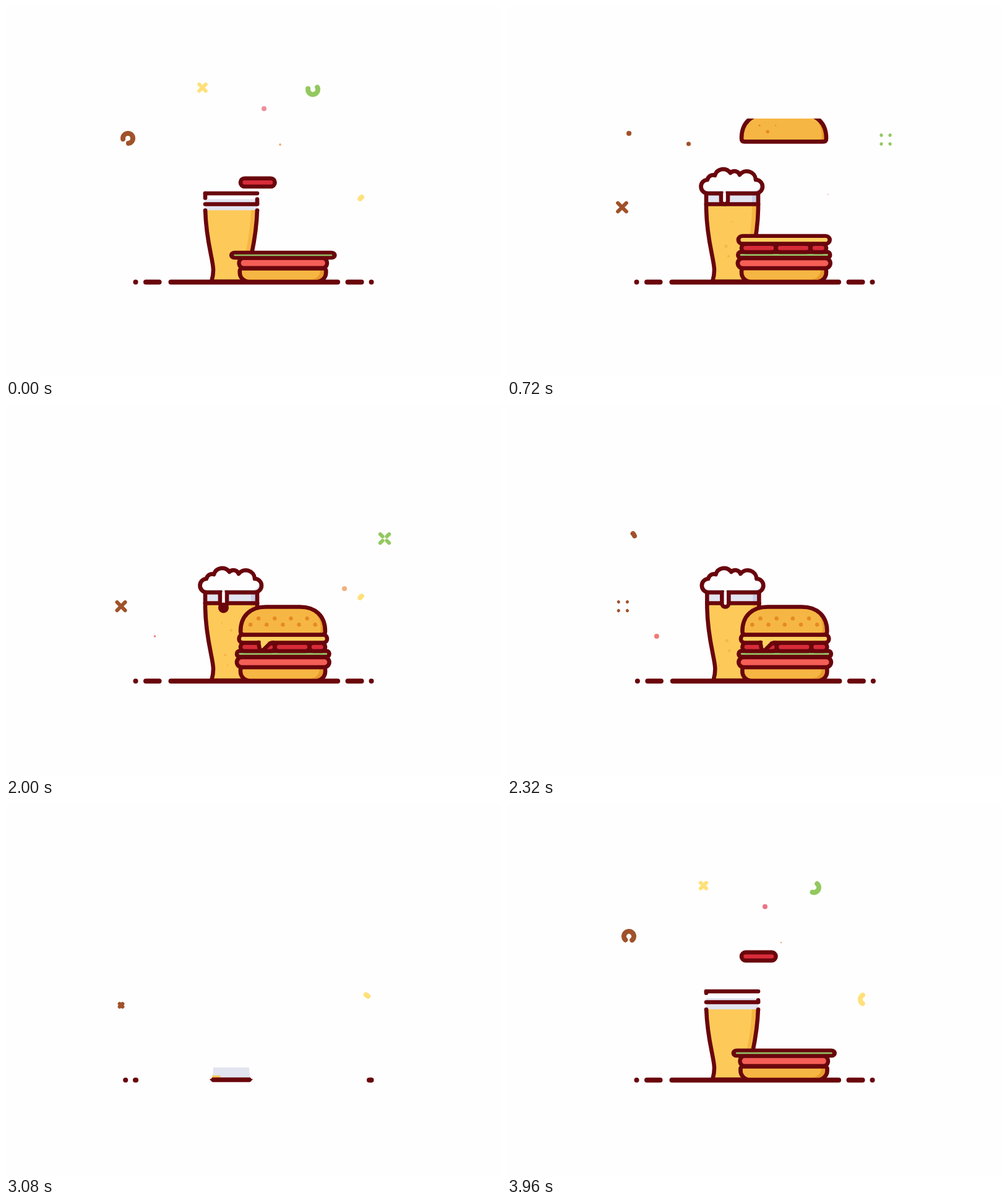
Recreate the animation shown at these times as an HTML page with a canvas. Size 800 px wide and 600 px high, loop 4000 ms.

```html
<!DOCTYPE html>
<html lang="en">
<head>
<meta charset="utf-8">
<title>Beer and burger</title>
<style>
  html, body { margin: 0; width: 100%; height: 100%; overflow: hidden; background: #fefefe; }
  canvas { display: block; }
</style>
</head>
<body>
<canvas id="stage" width="800" height="600"></canvas>
<script>
const ctx = document.getElementById('stage').getContext('2d');
const LOOP = 4000, BUILD_START = 2810, CONFETTI_PERIOD = LOOP / 3, STROKE = 6.6;
const INK = '#69060c', WHITE = '#fefefe', GLASS = '#e2e4f0', BEER = '#fdca59';
const BUN = '#f6b643', BUN_SHADE = '#e99a2c', CHEESE = '#fdd060', TOMATO = '#d82c39';
const BROWN = '#a0522a', YELLOW = '#ffe07a', GREEN = '#93c85f', PINK = '#ea7488', ORANGE = '#f0a56c';

const clamp = v => Math.max(0, Math.min(1, v));
const ramp = (t, start, duration) => clamp((t - start) / duration);
const mix = (a, b, p) => a + (b - a) * p;
const easeOut = p => 1 - (1 - p) ** 3;
const easeInOut = p => p < .5 ? 4 * p ** 3 : 1 - 4 * (1 - p) ** 3;
const backOut = p => 1 + 2.7 * (p - 1) ** 3 + 1.7 * (p - 1) ** 2;
const wobble = d => d < 0 ? 0 : Math.exp(-d / 220) * Math.sin(d * Math.PI / 150);

function scoped(draw) { ctx.save(); draw(); ctx.restore(); }

function line(x1, y1, x2, y2, width = STROKE, color = INK) {
  ctx.strokeStyle = color;
  ctx.lineWidth = width;
  ctx.beginPath();
  ctx.moveTo(x1, y1);
  ctx.lineTo(x2, y2);
  ctx.stroke();
}

function disc(x, y, r, color) {
  ctx.fillStyle = color;
  ctx.beginPath();
  ctx.arc(x, y, Math.max(0, r), 0, 7);
  ctx.fill();
}

function outline(path) {
  ctx.strokeStyle = INK;
  ctx.lineWidth = STROKE;
  ctx.stroke(path);
}

function outlined(path, fill) {
  ctx.fillStyle = fill;
  ctx.fill(path);
  outline(path);
}

// Fills with a shade, then with the main colour shifted inside the same shape.
function shaded(path, base, shade, dx, dy) {
  scoped(() => {
    ctx.clip(path);
    ctx.fillStyle = shade;
    ctx.fill(path);
    ctx.translate(dx, dy);
    ctx.fillStyle = base;
    ctx.fill(path);
  });
  outline(path);
}

function rounded(x1, y1, x2, y2, r) {
  const path = new Path2D();
  path.roundRect(x1, y1, x2 - x1, y2 - y1, r);
  return path;
}

const side = 'M322 303V328C323 380 335 410 335 427Q335 436 332.5 444';
const leftSide = new Path2D(side);
const rightSide = new Path2D('M406 303V328C405 380 393 410 393 427Q393 436 395.5 444');
const glassBody = new Path2D(side + 'H395.5Q393 436 393 427C393 410 405 380 406 328V303Z');
const foam = new Path2D('M325 303A11 11 0 0 1 324 281A9 9 0 0 1 336 274A14 14 0 0 1 361 270' +
  'A9 9 0 0 1 376 273A14.5 14.5 0 0 1 402 281A11 11 0 0 1 402 303Z');
const topBun = new Path2D('M384 371.5Q379 371.5 379 366C379 341 395 326.5 420 326.5H475' +
  'C500 326.5 516 341 516 366Q516 371.5 511 371.5Z');
const bottomBun = rounded(379, 424, 516, 446, [4, 4, 15, 15]);
const cheeseDrip = new Path2D('M408 384L409.5 393Q412 400 417 395L423 389Q428 384.5 432 384.5');

// Drops a layer onto the pile and lets it wobble around its lower edge.
function drop(t, landing, centerX, baseY, amount, draw) {
  const p = ramp(t, landing - 470, 470);
  if (p <= 0) return;
  const squash = amount * wobble(t - landing);
  scoped(() => {
    ctx.beginPath();
    ctx.rect(0, 182, 800, 418);
    ctx.clip();
    ctx.translate(centerX, baseY - 300 * (1 - p * p));
    ctx.scale(1 + squash, 1 - squash * .8);
    ctx.translate(-centerX, -baseY);
    draw();
  });
}

function drawGround(t) {
  if (t < 3030) return;
  const grow = easeOut(ramp(t, 3080, 400));
  const spread = easeOut(ramp(t, 3100, 420));
  const dotX = mix(183, 209.5, ramp(t, 3030, 130));
  line(dotX, 446.5, dotX, 446.5, 8);
  line(mix(209, 226, grow), 446.5, mix(210, 247.5, grow), 446.5, 8);
  if (spread) line(mix(364, 266.5, spread), 446.5, mix(364, 536, spread), 446.5, 8);
  line(mix(587, 552.5, grow), 446.5, mix(589, 574.5, grow), 446.5, 8);
  line(590.5, 446.5, 590.5, 446.5, 8);
}

function drawBubbles(t) {
  if (t < 4560) return;
  const xs = [342, 354, 364, 375, 388, 349, 358];
  xs.forEach((x, i) => {
    const p = ((t - 4560) / 1500 + i * .37) % 1;
    disc(x, 440 - 108 * p, 2.6 * Math.sin(Math.PI * p), '#f4b84b');
  });
}

function drawGlass(t) {
  if (t < 3010) return;
  const glassTop = mix(443, 303, easeOut(ramp(t, 3010, 1667)));
  const beerTop = mix(443, 320, easeOut(ramp(t, 3062, 1667)));
  const strokeTop = mix(446, 320, easeOut(ramp(t, 3075, 1640)));
  scoped(() => {
    ctx.clip(glassBody);
    ctx.fillStyle = GLASS;
    ctx.fillRect(310, glassTop, 110, 444 - glassTop);
    if (t > 4300) {
      ctx.fillStyle = '#c9cfe6';
      ctx.fillRect(396, 303, 10, 17);
    }
    ctx.fillStyle = BEER;
    const beerWidth = Math.max(0, t - 3060) * .7;
    ctx.fillRect(336 - Math.min(20, beerWidth / 4), beerTop, Math.min(90, beerWidth), 444 - beerTop);
    if (t > 3200) {
      ctx.beginPath();
      ctx.rect(310, Math.max(beerTop, 323), 110, 130);
      ctx.clip();
      ctx.translate(-6, 0);
      ctx.strokeStyle = BUN;
      ctx.lineWidth = 8;
      ctx.stroke(rightSide);
      ctx.translate(6, 0);
    }
    drawBubbles(t);
  });

  line(335, 446, 393, 446, 7.5);
  scoped(() => {
    ctx.beginPath();
    ctx.rect(300, strokeTop, 120, 460 - strokeTop);
    ctx.clip();
    outline(leftSide);
    outline(rightSide);
  });
  if (strokeTop > 321 && strokeTop < 425) {
    const inset = 13 * (Math.max(0, strokeTop - 345) / 80) ** .8;
    disc(322 + inset, strokeTop, STROKE / 2, INK);
    disc(406 - inset, strokeTop, STROKE / 2, INK);
  }

  const rim = easeInOut(ramp(t, 3620, 300));
  if (rim) {
    line(322, 320.5, mix(322, 406, rim), 320.5);
    line(406, 303, mix(406, 322, rim), 303);
  }
  const stub = 17 * ramp(t, 3938, 140);
  if (stub) {
    line(322, 303, 322, 303 + stub);
    line(406, 320, 406, 320 - stub);
  }
}

function drawDrop(t, fallStart) {
  const swell = ramp(t, fallStart - 200, 200), age = Math.max(0, t - fallStart);
  const y = 328 + .0017 * age * age;
  if (!swell || y > 440) return;
  const size = swell * (1 - ramp(y, 405, 35));
  disc(351.5, y, 9 * size, INK);
  if (age > 60) disc(351.5, y, 2.2 * size, WHITE);
}

function drawFoam(t) {
  const p = ramp(t, 4220, 380);
  if (!p) return;
  scoped(() => {
    const s = backOut(p);
    ctx.translate(364, 303);
    ctx.scale(s, s);
    ctx.translate(-364, -303);
    shaded(foam, WHITE, '#dfe6f5', -4, -4);
  });
  const length = ramp(t, 4560, 240);
  if (!length) return;
  const end = mix(303, 321, length);
  drawDrop(t, 5000);
  drawDrop(t, 6030);
  outlined(new Path2D(`M346 303V${end}A5.5 5.5 0 0 0 357 ${end}V303`), WHITE);
  ctx.fillStyle = WHITE;
  ctx.fillRect(349.5, 298, 4, end - 297);
  if (t > 5850 && t < 6030) disc(351.5, 328, 8.5 * ramp(t, 5850, 120), INK);
}

function drawSeeds(t) {
  const starts = [4850, 4690, 4640, 4700, 4890, 5170, 4960, 5110, 5010];
  starts.forEach((start, i) => {
    disc(395 + 13.1 * i, i % 2 ? 345.3 : 355.3, 3.2 * easeOut(ramp(t, start, 160)), '#e58a22');
  });
}

function drawBurger(t) {
  drop(t, 3600, 447.5, 446, .12, () => shaded(bottomBun, BUN, BUN_SHADE, -9, -4));
  drop(t, 3765, 447.5, 424, .14, () => outlined(rounded(373, 408, 522.5, 424, 8), '#f55f56'));
  drop(t, 3925, 447.5, 407, .16, () => outlined(rounded(373, 397.8, 522.5, 407.3, 4.7), '#94bd63'));
  [[379, 434.5, 4092], [434.5, 490.5, 4255], [490.5, 516, 4420]].forEach(([x1, x2, landing]) =>
    drop(t, landing, (x1 + x2) / 2, 398, .1, () => outlined(rounded(x1, 384.7, x2, 398, 6.6), TOMATO)));
  drop(t, 4590, 447.5, 384.5, .16, () => {
    outlined(rounded(376.5, 371.5, 519, 384.5, 6.5), CHEESE);
    const sag = ramp(t, 4860, 220);
    if (!sag) return;
    ctx.translate(0, 384);
    ctx.scale(1, backOut(sag));
    ctx.translate(0, -384);
    outlined(cheeseDrip, CHEESE);
    ctx.fillStyle = CHEESE;
    ctx.beginPath();
    ctx.moveTo(411, 380);
    ctx.lineTo(432, 380);
    ctx.lineTo(424, 383);
    ctx.lineTo(414, 393);
    ctx.fill();
  });
  drop(t, 4860, 447.5, 371.5, .25, () => {
    shaded(topBun, BUN, BUN_SHADE, -7, -3);
    drawSeeds(t);
  });
}

// Confetti: each piece repeats with its own start and life span.
function life(t, start, span, period = CONFETTI_PERIOD) {
  const age = (t - start + 2 * period) % period;
  return age < span ? age / span : -1;
}

function cross(t, x, y, color, start, span, reach) {
  const p = life(t, start, span);
  if (p < 0) return;
  const outer = reach * easeOut(Math.min(1, p * 1.15 + .06));
  const inner = Math.min(outer, reach * easeInOut(clamp(p * 1.8 - .8)));
  const width = 6 * (1 - clamp((p - .8) / .2) ** 2);
  for (const sx of [-1, 1]) for (const sy of [-1, 1])
    line(x + sx * inner, y + sy * inner, x + sx * outer, y + sy * outer, width, color);
}

function swirl(x, y, color, from, to) {
  const rad = Math.PI / 180;
  ctx.strokeStyle = color;
  ctx.lineWidth = 8;
  ctx.beginPath();
  ctx.arc(x, y, 8, from * rad, Math.max(to, from + 1) * rad);
  ctx.stroke();
}

function drawConfetti(t) {
  cross(t, 317.5, 132, YELLOW, 1175, 450, 6.2);
  cross(t, 186, 325.5, BROWN, 375, 690, 7.2);
  cross(t, 612, 216, GREEN, 430, 330, 7.2);

  let p = life(t, 706, 900);
  if (p >= 0) swirl(197, 214, BROWN, -90 + 600 * p ** 2.3, -90 + 600 * easeInOut(p));
  p = life(t, 1225, 500);
  if (p >= 0) swirl(496, 135, GREEN, -70 + 500 * p ** 1.6, -70 + 500 * easeOut(p));
  p = life(t, 395, 290, CONFETTI_PERIOD / 2);
  if (p >= 0) swirl(579, 316, YELLOW, -70 + 310 * ramp(p, .5, .48),
    Math.min(240, -40 + 310 * easeInOut(ramp(p, .35, .4))));

  const dots = [
    [417, 166, PINK, 3480], [443, 224, ORANGE, 3900], [519, 304.5, PINK, 685], [293.5, 223, BROWN, 450],
    [489, 278, BROWN, 1110], [547, 297, ORANGE, 1490], [240.5, 374, '#ed7b76', 1910]
  ];
  for (const [x, y, color, start] of dots) {
    const age = life(t, start, 690, LOOP);
    if (age < 0) continue;
    ctx.globalAlpha = 1 - clamp((age - .7) / .3);
    disc(x, y, 4 * easeOut(Math.min(1, age * 1.3)), color);
    ctx.globalAlpha = 1;
  }
}

function render(time) {
  const t = time < BUILD_START ? time + LOOP : time;
  const exit = easeInOut(ramp(t, 6280, 530));
  ctx.fillStyle = WHITE;
  ctx.fillRect(0, 0, 800, 600);
  ctx.lineCap = ctx.lineJoin = 'round';
  scoped(() => {
    ctx.translate(800 * exit, -2 * exit);
    drawConfetti(time);
    drawGround(t);
    drawGlass(t);
    drawFoam(t);
    drawBurger(t);
  });
}

function tick() {
  render(Math.floor(performance.now() % LOOP / 40) * 40);
  requestAnimationFrame(tick);
}
tick();
</script>
</body>
</html>
```
